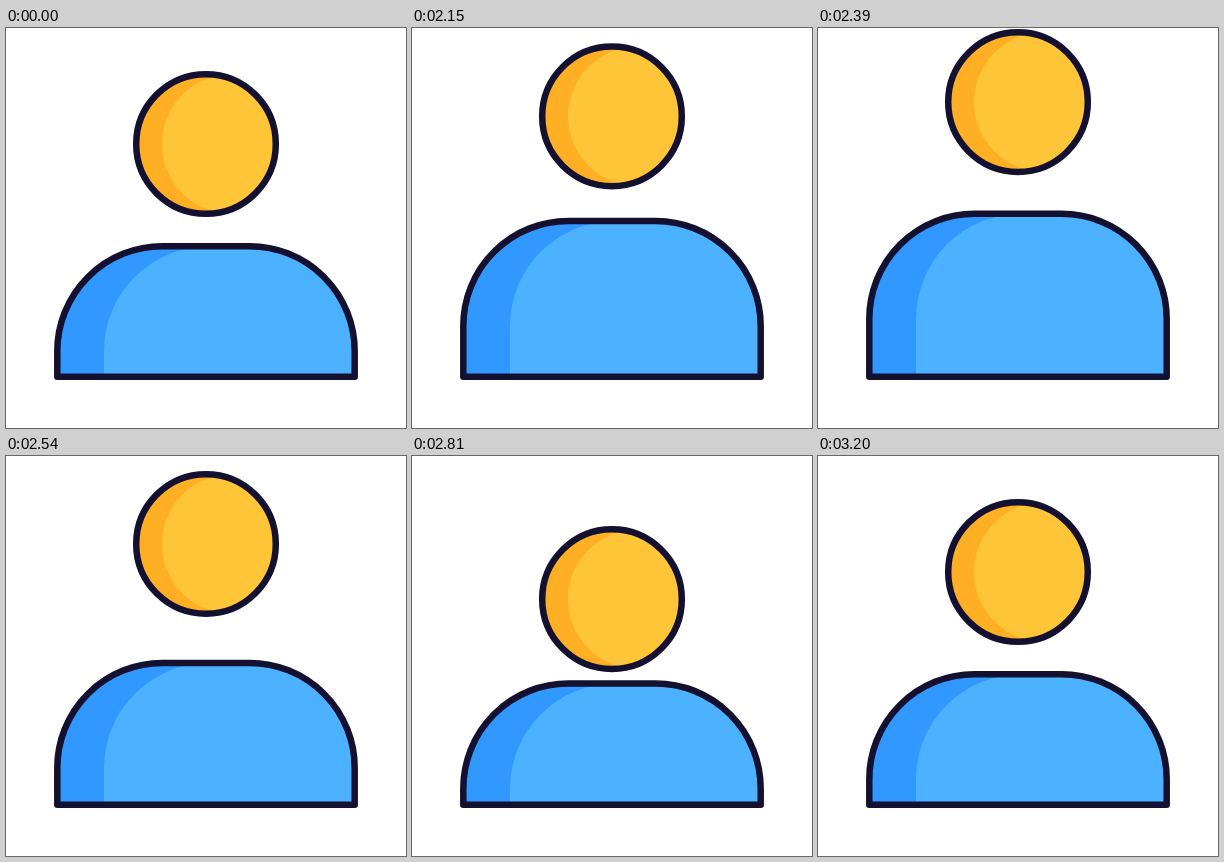
Recreate the animation shown at these times as an HTML page with a canvas. Size 400 px wide and 400 px high, loop 3.23 s.

```html
<!DOCTYPE html>
<html lang="en">
<head>
<meta charset="utf-8">
<title>User icon</title>
<style>
  html, body { margin: 0; width: 100%; height: 100%; overflow: hidden; background: #fff; }
  canvas { display: block; width: 100vmin; height: 100vmin; }
</style>
</head>
<body>
<canvas></canvas>
<script>
const SIZE = 400, LOOP = 3230, REST = 2000, STEP = 30;
const INK = '#13112f';
const canvas = document.querySelector('canvas');
const ctx = canvas.getContext('2d');
const ratio = window.devicePixelRatio || 1;
canvas.width = canvas.height = SIZE * ratio;
ctx.scale(ratio, ratio);

// Cubic easing with flat ends; x1 and x2 set how long it lingers there.
const bezier = (x1, x2) => x => {
  let lo = 0, hi = 1;
  for (let i = 0; i < 24; i++) {
    const s = (lo + hi) / 2, r = 1 - s;
    if (3 * r * r * s * x1 + 3 * r * s * s * x2 + s ** 3 < x) lo = s; else hi = s;
  }
  return lo * lo * (3 - 2 * lo);
};
const smooth = x => x * x * (3 - 2 * x);
const easeOut = x => 1 - (1 - x) ** 2.1;

// Each key: step, value, easing used to arrive there.
const headKeys = [
  [0, 116], [12.5, 74, bezier(0.41, 0.14)],
  [25.5, 144, bezier(0.68, 0.58)], [40, 116, smooth]
];
const bodyKeys = [
  [0, 218.2], [11, 183.2, easeOut],
  [24.5, 228.2, smooth], [40, 218.2, smooth]
];

function valueAt(keys, step) {
  for (let i = 1; i < keys.length; i++) {
    const [from, a] = keys[i - 1], [to, b, ease] = keys[i];
    if (step <= to) return a + (b - a) * ease((step - from) / (to - from));
  }
  return keys[keys.length - 1][1];
}

function disc(x, y) {
  const path = new Path2D();
  path.arc(x, y, 69.8, 0, Math.PI * 2);
  return path;
}

function dome(left, right, top) {
  const bottom = 348.7, radius = 105;
  const path = new Path2D();
  path.moveTo(left, bottom);
  path.lineTo(left, top + radius);
  path.arc(left + radius, top + radius, radius, Math.PI, Math.PI * 1.5);
  path.arc(right - radius, top + radius, radius, -Math.PI / 2, 0);
  path.lineTo(right, bottom);
  path.closePath();
  return path;
}

function paint(outline, light, darkColor, lightColor) {
  ctx.fillStyle = darkColor;
  ctx.fill(outline);
  ctx.save();
  ctx.clip(outline);
  ctx.fillStyle = lightColor;
  ctx.fill(light);
  ctx.restore();
  ctx.strokeStyle = INK;
  ctx.lineWidth = 6.5;
  ctx.lineJoin = 'round';
  ctx.stroke(outline);
}

function draw(time) {
  const step = Math.max(0, Math.floor((time % LOOP - REST) / STEP));
  const headY = valueAt(headKeys, step);
  const top = valueAt(bodyKeys, step);
  ctx.fillStyle = '#fff';
  ctx.fillRect(0, 0, SIZE, SIZE);
  paint(dome(51.3, 348.7, top), dome(98, 396, top), '#3198ff', '#4cb1ff');
  paint(disc(200, headY), disc(225.8, headY), '#ffaf23', '#ffc539');
}

const start = performance.now();
function tick() {
  draw(performance.now() - start);
  requestAnimationFrame(tick);
}
tick();
</script>
</body>
</html>
```
